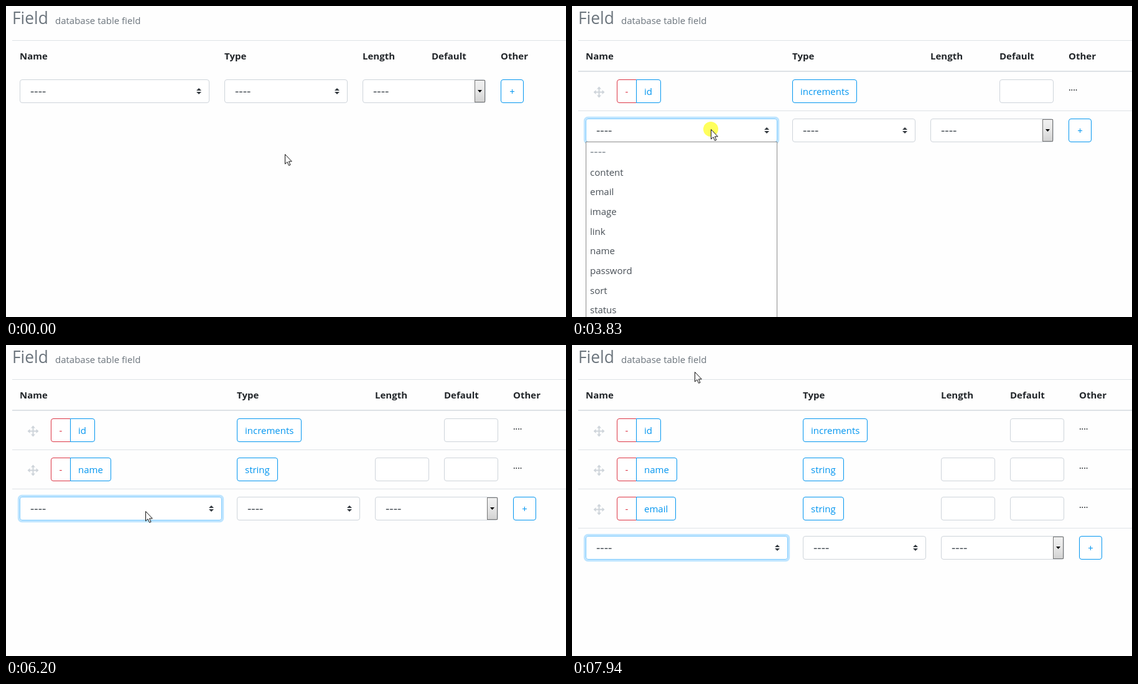
Write an HTML page that moves like this. It is 900 px wide and 500 px high and loops after 8 s.

```html
<!DOCTYPE html>
<html lang="en">
<head>
<meta charset="utf-8">
<title>Field</title>
<style>
  html, body { margin: 0; width: 100%; height: 100%; overflow: hidden; background: #fefefe; }
  svg { display: block; width: 900px; height: 500px; }
  text { font: 15px "Open Sans", "Noto Sans", sans-serif; fill: #495057; white-space: pre; }
  .title { font-size: 26.4px; fill: #6c757d; }
  .sub { fill: #6c757d; }
  .head { font-weight: 700; fill: #212529; }
  .dash { font-size: 19.8px; }
  .dots { font-size: 13px; font-weight: 600; fill: #212529; }
  .box { fill: #fff; stroke: #ced4da; }
  .btn { fill: #fff; stroke: #0396f0; }
  .del { fill: #fff; stroke: #dc3545; }
  .blue { fill: #0396f0; }
  .red { fill: #dc3545; }
  .mute { fill: #868e96; }
  .on { fill: #fff; }
  .ring { fill: none; stroke: #bfe5ff; stroke-width: 3.4; }
  .focus { fill: #fff; stroke: #80ccff; }
  .menu { fill: #fff; stroke: #8c8c8c; }
  #halo { fill: #ffff5c; mix-blend-mode: multiply; }
</style>
</head>
<body>
<svg viewBox="0 0 900 500">
  <defs>
    <linearGradient id="grey" x2="0" y2="1">
      <stop offset="0" stop-color="#f1f1f1"/>
      <stop offset=".5" stop-color="#e6e6e6"/>
      <stop offset="1" stop-color="#d2d2d2"/>
    </linearGradient>
    <g id="move" fill="#ced4da">
      <path d="M-6-1H6V1H-6zM-1-6H1V6H-1z"/>
      <path d="M0-9l3.5 4h-7zM0 9l3.5-4h-7zM-9 0l4-3.5v7zM9 0l-4-3.5v7z"/>
    </g>
  </defs>
  <g id="page"></g>
  <circle id="halo" r="12"/>
  <path id="cursor" d="M.5.5V16L4 12.7 6.6 18.4 9 17.4 6.5 11.9H11.3Z" fill="#fff" stroke="#111" stroke-linejoin="round"/>
</svg>
<script>
const LOOP = 8000, STEP = 80, ITEM = 31.67;
const page = document.getElementById('page');
const halo = document.getElementById('halo');
const cursor = document.getElementById('cursor');

const menus = {
  type: ['----', 'id', 'user_id', 'created_at', 'updated_at', 'deleted_at', 'float', 'float 0', 'integer', 'integer 0', 'string'],
  name: ['----', 'content', 'email', 'image', 'link', 'name', 'password', 'sort', 'status']
};

// name, button width, type, button width
const fields = [
  ['id', 40, 'increments', 104],
  ['name', 66, 'string', 66],
  ['email', 64, 'string', 66]
];

// each entry changes part of the state from its time on
const changes = [
  [0, { rows: 0, dx: 0, focus: '', menu: '', up: false, halo: false }],
  [1240, { menu: 'type', halo: true }],
  [1320, { focus: 'type' }],
  [1400, { halo: false }],
  [2180, { menu: '' }],
  [2260, { rows: 1, dx: 3 }],
  [3750, { menu: 'name', halo: true }],
  [3830, { focus: 'name' }],
  [3910, { halo: false }],
  [5330, { menu: '', rows: 2, dx: 20 }],
  [6440, { menu: 'name', up: true, halo: true }],
  [6590, { halo: false }],
  [7860, { menu: '' }],
  [7940, { rows: 3 }]
];

const smooth = p => p * p * (3 - 2 * p);
const easeOut = p => 1 - (1 - p) ** 2.2;

// start time, steps, easing, bend point, end point
const moves = [
  [450, 9, smooth, [436, 190], [451, 147]],
  [1630, 4, easeOut, [443, 176], [431, 203]],
  [2800, 1, smooth, [430, 204], [430, 204]],
  [2880, 4, smooth, [327, 204], [224, 198]],
  [3280, 1, smooth, [223, 198], [223, 198]],
  [4450, 11, easeOut, [219, 297], [214, 396]],
  [5800, 7, easeOut, [217, 330], [224, 265]],
  [6900, 11, p => p ** 1.15, [218.6, 154], [197, 43]]
];

function pointer(t) {
  let pos = [448, 238];
  for (const [start, steps, ease, bend, end] of moves) {
    if (t < start) break;
    const k = Math.min(steps, Math.floor((t - start) / STEP) + 1);
    const e = ease(k / steps), f = 1 - e;
    pos = pos.map((v, i) => Math.round(f * f * v + 2 * e * f * bend[i] + e * e * end[i]));
  }
  return pos;
}

const text = (x, y, s, cls = '', anchor = 'start') =>
  `<text x="${x}" y="${y}" class="${cls}" text-anchor="${anchor}">${s}</text>`;
const box = (x, y, w, h, cls, r = 3.5) =>
  `<rect x="${x + .5}" y="${y + .5}" width="${w - 1}" height="${h - 1}" rx="${r}" class="${cls}"/>`;
const line = (y, h = 1) => `<rect x="10" y="${y}" width="890" height="${h}" fill="#dee2e6"/>`;
const button = (x, y, w, s) => box(x, y, w, 38, 'btn') + text(x + 13, y + 25, s, 'blue');

function select(x, y, w, focused) {
  const ring = focused ? `<rect x="${x - 1.5}" y="${y - 1.5}" width="${w + 3}" height="41" rx="5" class="ring"/>` : '';
  return ring + box(x, y, w, 38, focused ? 'focus' : 'box') + text(x + 17, y + 25.5, '----', 'dash') +
    `<path d="M${x + w - 21} ${y + 18}l4-4 4 4zm0 2l4 4 4-4z" fill="#343a40"/>`;
}

function combo(x, y) {
  return box(x, y, 198, 38, 'box') + text(x + 17, y + 25.5, '----', 'dash') +
    `<rect x="${x + 180.5}" y="${y + 1.5}" width="16" height="35" fill="url(#grey)" stroke="#777"/>` +
    `<path d="M${x + 185} ${y + 17}h7l-3.5 4z" fill="#000"/>`;
}

function row([name, nameW, type, typeW], y, dx) {
  return `<use href="#move" x="43.5" y="${y + 20.5}"/>` +
    `<path d="M103.5 ${y + .5}H76a3.5 3.5 0 0 0-3.5 3.5v30a3.5 3.5 0 0 0 3.5 3.5H103.5" class="del"/>` +
    text(88, y + 25, '-', 'red', 'middle') +
    `<path d="M103.5 ${y + .5}h${nameW - 4.5}a3.5 3.5 0 0 1 3.5 3.5v30a3.5 3.5 0 0 1-3.5 3.5H103.5z" class="btn"/>` +
    text(116, y + 25, name, 'blue') +
    button(351 + dx, y, typeW, type) +
    (type === 'string' ? box(573 + dx, y, 87, 38, 'box') : '') +
    box(684 + dx, y, 87, 38, 'box') +
    text(795 + dx, y + 18, '....', 'dots') + line(y + 50);
}

// geometry of the open list
function listOf(s) {
  const y = 118 + 63 * s.rows, items = menus[s.menu];
  const top = s.up ? y - 1.7 - ITEM * items.length : y + 38;
  return s.menu === 'type'
    ? { items, top, x: 351 + s.dx, w: 198 }
    : { items, top, x: 22, w: 305 + s.dx - (s.up ? 1 : 0) };
}

function hovered(s, y) {
  if (!s.menu) return -1;
  const { items, top } = listOf(s);
  const i = Math.floor((y - top) / ITEM);
  return i > 0 && i < items.length ? i : -1;
}

function list(s, hover) {
  const { items, top, x, w } = listOf(s);
  const h = s.up ? ITEM * items.length + 1 : 520;
  return box(x, Math.round(top) - 1, w, Math.round(h) + 1, 'menu', 0) + items.map((item, i) => {
    const y = Math.round(top + i * ITEM);
    const bar = i === hover ? `<rect x="${x + 1}" y="${y}" width="${w - 2}" height="${Math.round(top + (i + 1) * ITEM) - y}" fill="#39f"/>` : '';
    return bar + text(x + 7, y + 22, item, i === hover ? 'on' : i ? '' : 'dash mute');
  }).join('');
}

function draw(s, hover) {
  const { dx, rows } = s, y = 118 + 63 * rows;
  const heads = [['Name', 22], ['Type', 351 + dx], ['Length', 573 + dx], ['Default', 684 + dx], ['Other', 795 + dx]];
  return text(10, 29, 'Field', 'title') + text(79, 29, 'database table field', 'sub') + line(55) +
    heads.map(([s, x]) => text(x, 86, s, 'head')).join('') +
    (rows ? line(104, 2) : '') +
    fields.slice(0, rows).map((f, i) => row(f, 118 + 63 * i, dx)).join('') +
    select(22, y, 305 + dx, s.focus === 'name') +
    select(351 + dx, y, 198, s.focus === 'type') +
    combo(573 + dx, y) +
    box(795 + dx, y, 37, 38, 'btn') + text(813.5 + dx, y + 25, '+', 'blue', 'middle') +
    (s.menu ? list(s, hover) : '');
}

let shown = '';
function tick(now) {
  const t = now % LOOP;
  const state = Object.assign({}, ...changes.filter(c => c[0] <= t).map(c => c[1]));
  const [x, y] = pointer(t);
  const hover = hovered(state, y);
  const key = JSON.stringify([state, hover]);
  if (key !== shown) {
    page.innerHTML = draw(state, hover);
    shown = key;
  }
  const place = `translate(${x} ${y})`;
  cursor.setAttribute('transform', place);
  halo.setAttribute('transform', place);
  halo.setAttribute('visibility', state.halo ? 'visible' : 'hidden');
}

const begin = performance.now();
function loop() {
  tick(performance.now() - begin);
  requestAnimationFrame(loop);
}
loop();
</script>
</body>
</html>
```
